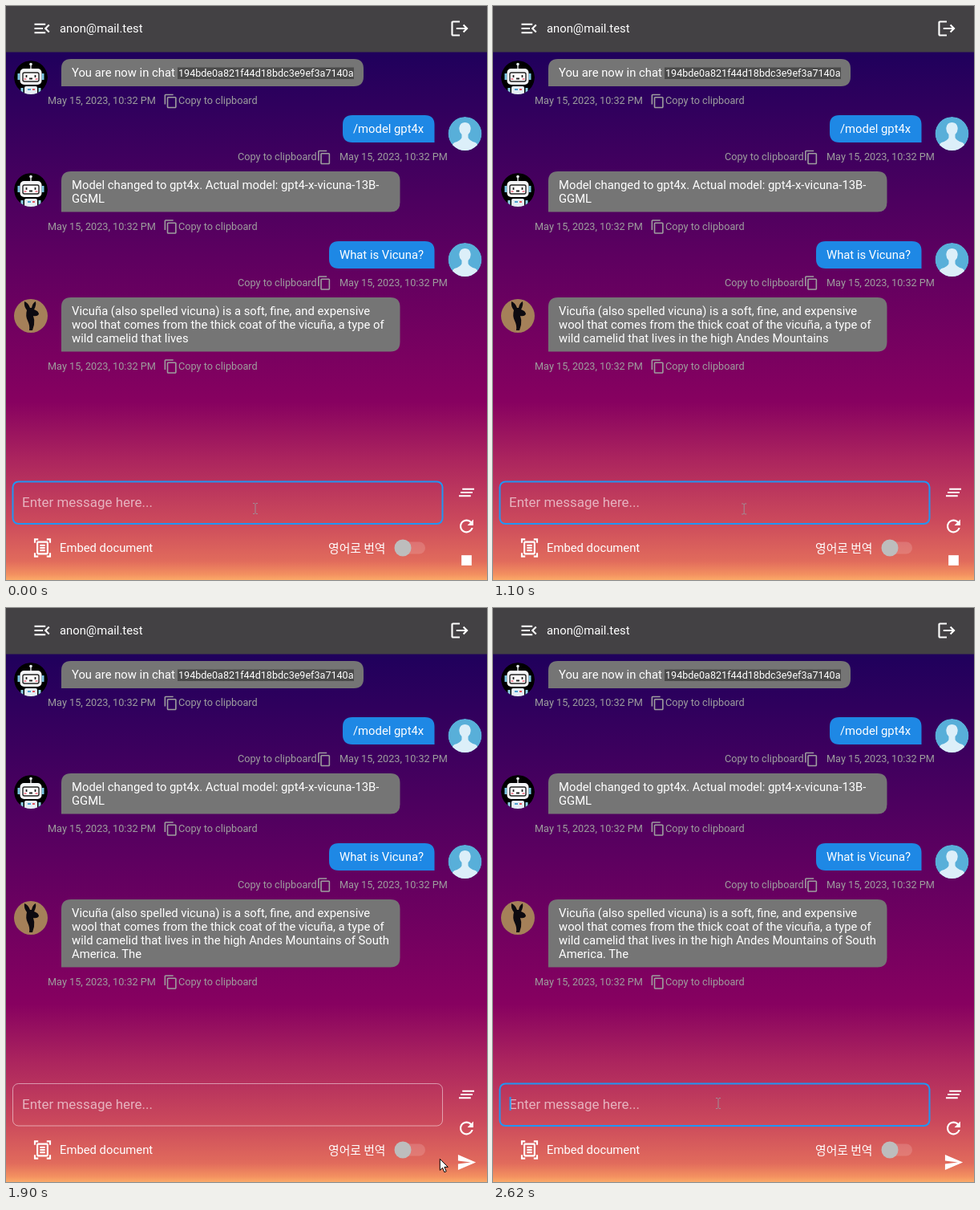
An HTML page for the animation above (2640 ms loop, 600 by 715 pixels).

```html
<!DOCTYPE html>
<html lang="en">
<head>
<meta charset="utf-8">
<title>Chat</title>
<style>
  html, body { margin: 0; width: 100%; height: 100%; overflow: hidden; background: #434144; }
  svg { display: block; }
  text { font: 14.82px Roboto, sans-serif; fill: #fff; }
  .meta, .meta text { font-size: 12.7px; fill: #9e9e9e; }
  .icon { fill: #fff; }
</style>
</head>
<body>
<svg id="stage" width="600" height="715" viewBox="0 0 600 715">
  <defs>
    <linearGradient id="sunset" gradientUnits="userSpaceOnUse" x1="0" y1="57" x2="0" y2="718">
      <stop offset="0" stop-color="#1f005c"/>
      <stop offset=".37" stop-color="#5b0060"/>
      <stop offset=".66" stop-color="#870160"/>
      <stop offset=".77" stop-color="#ac255e"/>
      <stop offset=".88" stop-color="#ca485c"/>
      <stop offset=".96" stop-color="#e16b5c"/>
      <stop offset=".985" stop-color="#f39060"/>
      <stop offset="1" stop-color="#ffb56b"/>
    </linearGradient>
    <clipPath id="disc"><circle r="21"/></clipPath>

    <g id="robot" clip-path="url(#disc)">
      <circle r="21"/>
      <path d="M0-15v5" stroke="#ddd" stroke-width="1.5"/>
      <circle cy="-16.5" r="1.8" fill="#e8eef2"/>
      <path d="M-15-5v8M15-5v8" stroke="#7cc5e6" stroke-width="3"/>
      <rect x="-13.5" y="-11" width="27" height="20" rx="5" fill="#f4f6f8"/>
      <rect x="-10" y="-6" width="20" height="11" rx="2" fill="#fff" stroke="#222" stroke-width="1.4"/>
      <path d="M-5.5-3v3M5.5-3v3M-2 1.5h4" stroke="#222" stroke-width="1.8"/>
      <path d="M-8.5 2h3M5.5 2h3" stroke="#f08a9a" stroke-width="2"/>
      <rect x="-8" y="11" width="16" height="11" rx="2" fill="#e4eef5"/>
      <path d="M-11 13v8M11 13v8" stroke="#8fd0e8" stroke-width="3"/>
      <path d="M-4 15h4" stroke="#4d9fd0" stroke-width="2"/>
      <path d="M2 15h3" stroke="#e0555f" stroke-width="2"/>
    </g>
    <g id="vicuna">
      <circle r="21" fill="#a58059"/>
      <path fill="#0d0a10" d="M-8-18Q-3-16-1-10L1-10Q2-16 6-18Q7-13 4-8Q10-6 10-2Q8 1 3 0Q5 5 4 11L2 18H-2Q-1 12-4 6Q-7 0-5-7Q-9-12-8-18Z"/>
    </g>
    <g id="person" clip-path="url(#disc)">
      <circle r="21" fill="#58afd9"/>
      <path fill="#dceff9" d="M-4 5V1Q-8-3-7-8Q-6-14 0-14T7-8Q8-3 4 1V5Q6 9 13 11Q17 13 17 22H-17Q-17 13-13 11Q-6 9-4 5Z"/>
    </g>

    <path id="copy" d="M16 1H4c-1.1 0-2 .9-2 2v14h2V3h12V1zm3 4H8c-1.1 0-2 .9-2 2v14c0 1.1.9 2 2 2h11c1.1 0 2-.9 2-2V7c0-1.1-.9-2-2-2zm0 16H8V7h11v14z"/>
    <path id="menu" d="M3 18h13v-2H3v2zM3 13h10v-2H3v2zm0-7v2h13V6H3zm18 9.59L17.42 12 21 8.41 19.59 7l-5 5 5 5L21 15.59z"/>
    <path id="logout" d="M17 7l-1.41 1.41L18.17 11H8v2h10.17l-2.58 2.58L17 17l5-5zM4 5h8V3H4c-1.1 0-2 .9-2 2v14c0 1.1.9 2 2 2h8v-2H4V5z"/>
    <path id="clear" d="M5 13h14v-2H5v2zm-2 4h14v-2H3v2zM7 7v2h14V7H7z"/>
    <path id="refresh" d="M17.65 6.35C16.2 4.9 14.21 4 12 4c-4.42 0-7.99 3.58-7.99 8s3.57 8 7.99 8c3.73 0 6.84-2.55 7.73-6h-2.08c-.82 2.33-3.04 4-5.65 4-3.31 0-6-2.69-6-6s2.69-6 6-6c1.66 0 3.14.69 4.22 1.78L13 11h7V4l-2.35 2.35z"/>
    <path id="stop" d="M6 6h12v12H6z"/>
    <path id="send" d="M2.01 21L23 12 2.01 3 2 10l15 2-15 2z"/>
    <path id="scan" d="M7 3H4v3H2V1h5v2zm15 3V1h-5v2h3v3h2zM7 21H4v-3H2v5h5v-2zm13-3v3h-3v2h5v-5h-2zM17 6H7v12h10V6zm2 12c0 1.1-.9 2-2 2H7c-1.1 0-2-.9-2-2V6c0-1.1.9-2 2-2h10c1.1 0 2 .9 2 2v12zM15 8H9v2h6V8zm0 3H9v2h6v-2zm0 3H9v2h6v-2z"/>

    <path id="beam" fill="none" stroke="#a08f97" d="M-3-6.5h2l1 1 1-1h2M0-5.5v11M-3 6.5h2l1-1 1 1h2"/>
    <path id="arrow" fill="#fff" stroke="#000" d="M0 0V14l3.3-3 2.3 5.4 2.3-1L5.6 10H10Z"/>
    <path id="hand" fill="#fff" stroke="#000" d="M-1.6 1.6q1.6-2.6 3.2 0V8l5.6 1.2q2 .6 2 2.6l-1.2 6v2H-1v-2l-4.6-6q.4-2 2-1.2l2 1.6Z"/>
  </defs>
</svg>
<script>
const LOOP = 2640, UNIT = 1.058, LINE = 17;

const icon = (id, x, y, scale = UNIT, extra = 'class="icon"') =>
  `<use href="#${id}" ${extra} transform="translate(${x - 12 * scale} ${y - 12 * scale}) scale(${scale})"/>`;
const avatar = (id, x, y) => `<use href="#${id}" x="${x}" y="${y}"/>`;
const label = (text, x, y, attrs = '') => `<text x="${x}" y="${y}" ${attrs}>${text}</text>`;

// Rounded box with one square corner at the sender's side.
function bubblePath(x, y, w, h, mine) {
  const r = 12, left = mine ? r : 0, right = mine ? 0 : r;
  return `M${x + r} ${y}h${w - 2 * r}q${r} 0 ${r} ${r}v${h - r - right}q0 ${right} ${-right} ${right}` +
    `h${left + right - w}q${-left} 0 ${-left} ${-left}V${y + r}q0 ${-r} ${r} ${-r}Z`;
}
const bubble = (x, y, w, h, mine, id = '') =>
  `<path id="${id}" d="${bubblePath(x, y, w, h, mine)}" fill="${mine ? '#1e88e5' : '#757575'}"/>`;

function meta(y, mine, id = '') {
  const [date, copy, glyph] = mine ? [416, 289, 397] : [52, 215, 205.5];
  return `<g class="meta" id="${id}">` + label('May 15, 2023, 10:32 PM', date, y + 4) +
    label('Copy to clipboard', copy, y + 4) + icon('copy', glyph, y + .5, .794, '') + '</g>';
}

const stage = document.getElementById('stage');
stage.insertAdjacentHTML('beforeend', `
  <path fill="url(#sunset)" d="M0 57h600v658H0z"/>
  <path fill="#434144" d="M0 0h600v57.5H0z"/>
  ${icon('menu', 45, 28)}${label('anon@mail.test', 67, 33)}${icon('logout', 566, 28)}

  ${avatar('robot', 31, 89)}${bubble(69, 66, 377, 34)}
  ${label('You are now in chat', 82, 88)}
  <path fill="#4a4a4a" d="M214 76.500h220v14.500h-220z"/>
  ${label('194bde0a821f44d18bdc3e9ef3a7140a', 215, 88, 'style="font-size:12.59px"')}
  ${meta(118)}

  ${avatar('person', 572.5, 159)}${bubble(420, 136, 114.5, 34, true)}
  ${label('/model gpt4x', 433, 158)}${meta(188, true)}

  ${avatar('robot', 31, 229)}${bubble(69, 206, 422.5, 50.5)}
  ${label('Model changed to gpt4x. Actual model: gpt4-x-vicuna-13B-', 82, 228)}
  ${label('GGML', 82, 245)}${meta(274.5)}

  ${avatar('person', 572.5, 316)}${bubble(403, 293, 131.5, 34, true)}
  ${label('What is Vicuna?', 416, 315)}${meta(344.5, true)}

  ${avatar('vicuna', 31, 386)}${bubble(69, 363, 422.5, 67.5, false, 'reply')}
  ${label('Vicuña (also spelled vicuna) is a soft, fine, and expensive', 82, 385)}
  ${label('wool that comes from the thick coat of the vicuña, a type of', 82, 402)}
  ${label('', 82, 418.5, 'id="line3"')}${label('', 82, 435.5, 'id="line4"')}
  ${meta(448.5, false, 'replyMeta')}

  <rect id="field" x="8.500" y="592.500" width="536" height="52.500" rx="7" fill="none"/>
  ${label('Enter message here...', 20, 624, 'style="font-size:16.94px" opacity=".6"')}
  <path id="caret" fill="#2196f3" d="M20.500 609h2v17h-2z"/>
  ${icon('clear', 574.5, 606)}${icon('refresh', 574.5, 648)}
  <use id="action" class="icon" transform="translate(561.8 677.8) scale(${UNIT})"/>
  ${icon('scan', 45.5, 675)}${label('Embed document', 67, 680)}
  ${label('영어로 번역', 402, 681, `style="font-family:'Noto Sans CJK KR','Noto Sans CJK',sans-serif"`)}
  <rect x="488" y="667.500" width="35" height="15" rx="7.500" fill="#fff" opacity=".15"/>
  <circle cx="495" cy="675" r="10.500" fill="#bdbdbd"/>

  <g id="tip">
    <rect x="515" y="639.500" width="79" height="26" rx="4" fill="#fff" opacity=".9"/>
    ${label('Stop query', 524, 657, 'style="font-size:12.7px;fill:#333"')}
  </g>
  <use id="cursor"/>`);

const $ = id => document.getElementById(id);
const show = (id, on) => $(id).setAttribute('visibility', on ? 'visible' : 'hidden');
const within = (t, from, to) => t >= from && t < to;

const tokens = [' in', ' the', ' high', ' And', 'es', ' Mountains', ' of', ' South', 'America', '.', ' The'];
const FIRST_LINE_TOKENS = 8;
// Time, x, y of the pointer.
const route = [[0, 311, 626], [1090, 311, 626], [1300, 589, 682], [1400, 589, 682], [1520, 567, 693],
  [1850, 567, 693], [2120, 292, 622], [2200, 292, 622], [2400, 281, 617], [LOOP, 281, 617]];

function pointerAt(t) {
  const i = route.findIndex(p => p[0] > t);
  const [t0, x0, y0] = route[i - 1], [t1, x1, y1] = route[i];
  const k = (t - t0) / (t1 - t0), e = k * k * (3 - 2 * k);
  return [x0 + (x1 - x0) * e, y0 + (y1 - y0) * e];
}

function render(t) {
  const count = Math.max(0, Math.min(tokens.length, Math.floor((t - 160) / 157) + 1));
  $('line3').textContent = 'wild camelid that lives' + tokens.slice(0, Math.min(count, FIRST_LINE_TOKENS)).join('');
  $('line4').textContent = tokens.slice(FIRST_LINE_TOKENS, count).join('');
  const grow = count > FIRST_LINE_TOKENS ? LINE : 0;
  $('reply').setAttribute('d', bubblePath(69, 363, 422.5, 67.5 + grow, false));
  $('replyMeta').setAttribute('transform', `translate(0 ${grow})`);

  const stopped = t >= 1800, focused = !within(t, 1800, 2400);
  $('field').setAttribute('stroke', focused ? '#2196f3' : 'rgba(255,255,255,.5)');
  $('field').setAttribute('stroke-width', focused ? 2 : 1);
  show('caret', within(t, 362, 858) || within(t, 1362, 1800) || t >= 2400);
  $('action').setAttribute('href', stopped ? '#send' : '#stop');

  const [x, y] = pointerAt(t);
  const onButton = x > 562 && x < 586 && y > 684;
  const onField = x < 545 && y > 592 && y < 645;
  show('tip', onButton && !stopped);
  $('cursor').setAttribute('href', onButton ? '#hand' : onField ? '#beam' : '#arrow');
  $('cursor').setAttribute('transform', `translate(${x} ${y})`);
}

const start = performance.now();
function tick() {
  render((performance.now() - start) % LOOP);
  requestAnimationFrame(tick);
}
tick();
</script>
</body>
</html>
```
